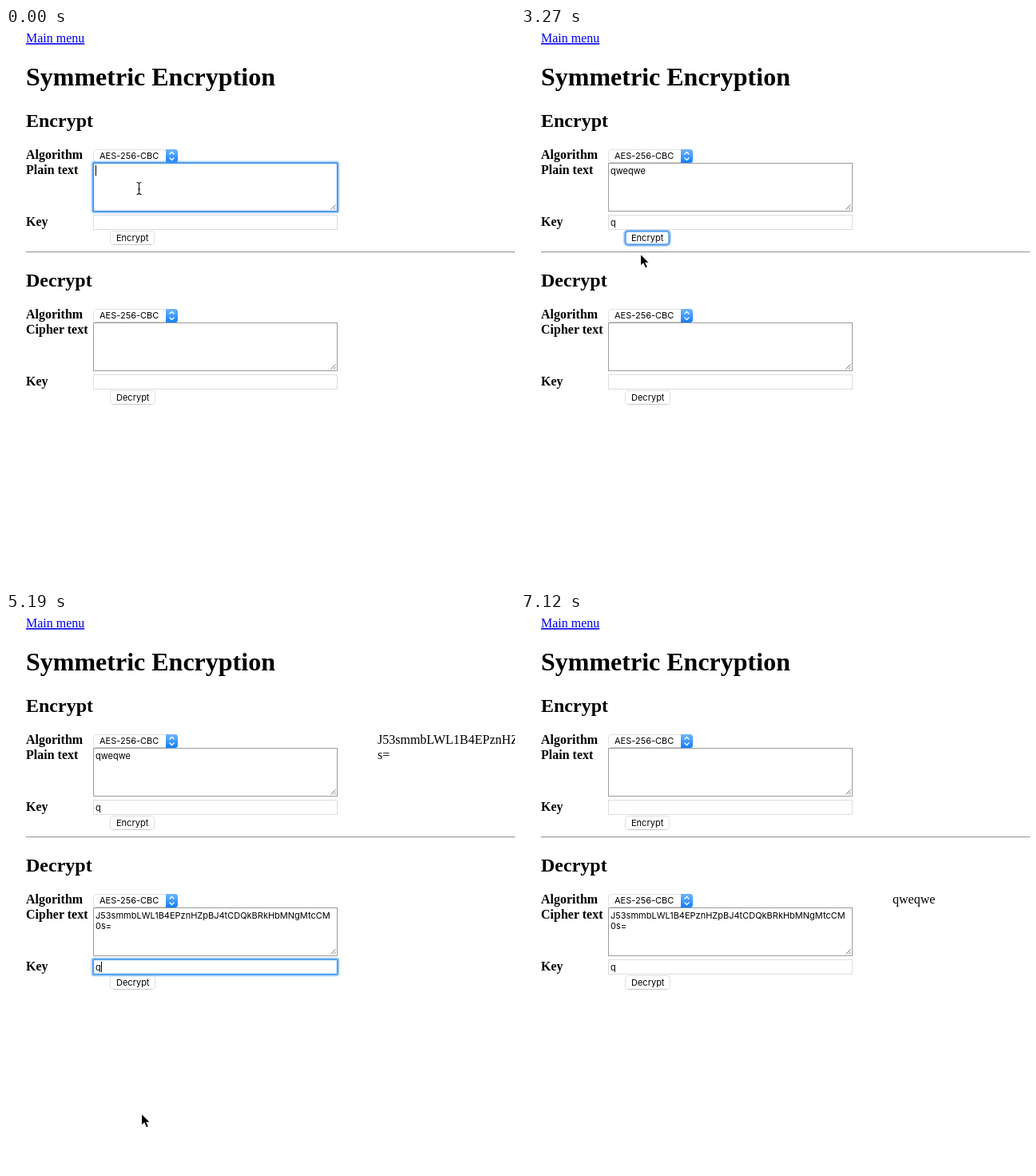
Animation of 637 by 698 pixels, one loop 7420 ms. Source, as an HTML page:

```html
<!DOCTYPE html>
<html lang="en">
<head>
<meta charset="utf-8">
<title>Symmetric Encryption</title>
<style>
html, body { margin: 0; width: 100%; height: 100%; overflow: hidden; background: #fff; }
svg { display: block; }
text { font: 16px "Liberation Serif", serif; white-space: pre; }
.h1 { font-size: 32px; font-weight: bold; }
.h2 { font-size: 24px; font-weight: bold; }
.label { font-weight: bold; }
.link { fill: #00e; text-decoration: underline; }
.ui { font: 11px Inter, sans-serif; }
.menu { font: bold 13px Inter, sans-serif; }
</style>
</head>
<body>
<svg id="stage" width="637" height="698" viewBox="0 0 637 698">
  <defs>
    <linearGradient id="blue" x2="0" y2="1"><stop stop-color="#6fb6fb"/><stop offset="1" stop-color="#127eff"/></linearGradient>
    <linearGradient id="pressed" x2="0" y2="1"><stop stop-color="#4f9ffa"/><stop offset="1" stop-color="#0a62e0"/></linearGradient>
  </defs>
  <g id="page"></g>
</svg>
<script>
const LOOP = 7420;
const CIPHER = 'J53smmbLWL1B4EPznHZpBJ4tCDQkBRkHbMNgMtcCM';
const SAVED = 'q4B3@qPzx4b#F27';
const page = document.getElementById('page');
const pen = document.createElement('canvas').getContext('2d');

// Each step changes part of the state; pointer = [kind, x, y]
const start = { plain: '', key1: '', key2: '', cipher: false, focus: 'plain', caret: true,
  menu: '', result: '', pressed: false, pointer: ['beam', 166.5, 201] };
const at = (x, y, kind = 'arrow') => ({ pointer: [kind, x, y] });
const steps = [
  [140, { plain: 'q' }],
  [290, { plain: 'qw' }],
  [440, { plain: 'qwe' }],
  [590, { plain: 'qweq' }],
  [740, { plain: 'qweqwe' }],
  [880, { focus: 'key1' }],
  [1330, { key1: 'q', ...at(166.5, 202, 'beam') }],
  [1630, { menu: 'key1' }],
  [1930, { menu: '', focus: 'button' }],
  [2980, at(164, 222, 'beam')],
  [3130, at(157, 252)],
  [3270, at(150, 284)],
  [3420, at(148, 300)],
  [3710, { focus: '', result: 'cipher', cipher: true, ...at(148, 324) }],
  [3860, at(149, 376, 'beam')],
  [4000, at(151, 414, 'beam')],
  [4150, at(152, 432)],
  [4300, at(155, 444, 'beam')],
  [4440, { focus: 'key2', ...at(155, 445, 'beam') }],
  [4590, { key2: 'q' }],
  [4740, { menu: 'key2', ...at(155, 457) }],
  [4890, { menu: '', ...at(158, 500) }],
  [5040, at(166, 575)],
  [5190, at(170, 628)],
  [5340, at(170, 612)],
  [5480, at(169, 550)],
  [5630, at(168, 490)],
  [5780, at(167.5, 457)],
  [5930, { focus: '', pressed: true }],
  [6080, { pressed: false }],
  [6220, { plain: '', key1: '', result: 'plain' }],
  [6520, at(205, 482)],
  [6670, at(310, 548)],
  [6820, at(430, 622)],
  [6970, at(546, 679)],
  [7120, { pointer: null }]
];

const esc = s => s.replace(/&/g, '&amp;').replace(/</g, '&lt;');
const text = (x, y, s, cls = '') => `<text x="${x}" y="${y}" class="${cls}">${esc(s)}</text>`;
const rect = (x, y, w, h, fill, more = '') => `<rect x="${x}" y="${y}" width="${w}" height="${h}" fill="${fill}" ${more}/>`;
const path = (d, stroke, more = '') => `<path d="${d}" fill="none" stroke="${stroke}" ${more}/>`;
const frame = (x, y, w, h, color, fill = '#fff', r = 0) =>
  rect(x + .5, y + .5, w - 1, h - 1, fill, `stroke="${color}" rx="${r}"`);
const width = s => { pen.font = '11px Inter, sans-serif'; return pen.measureText(s).width; };

function ring(x, y, w, h, r = 1) {
  return rect(x - .5, y - .5, w + 1, h + 1, 'none', `rx="${r + 1}" stroke="#5ca6f5" stroke-opacity=".45" stroke-width="4"`)
    + rect(x, y, w, h, 'none', `rx="${r}" stroke="#3c95ee" stroke-opacity=".75" stroke-width="2"`);
}

const caret = (s, y) => rect(112 + Math.ceil(width(s)), y, 1, 13, '#000');

function select(y) {
  return frame(109, y, 106, 17, '#e2e2e2', '#fff', 3.5)
    + path(`M112 ${y + 16.5}H201`, '#cfcfcf')
    + `<path d="M200 ${y}h11.500q3.500 0 3.500 3.500v10q0 3.500 -3.500 3.500h-11.500z" fill="url(#blue)"/>`
    + path(`M204.500 ${y + 6.5}l3 -3l3 3M204.500 ${y + 10.500}l3 3l3 -3`, '#fff', 'stroke-width="1.300"')
    + text(117, y + 12, 'AES-256-CBC', 'ui');
}

function area(y, lines, focused) {
  return frame(109, y, 306, 61, '#9b9b9b')
    + (focused ? ring(109, y, 306, 61) : '')
    + path(`M406.500 ${y + 58.5}l6 -6M410 ${y + 58.5}l2.500 -2.500`, '#777')
    + lines.map((s, i) => text(112, y + 14 + i * 13, s, 'ui')).join('');
}

function field(y, value, focused, filled) {
  let out = frame(109, y, 306, 19, '#dcdcdc', filled ? '#faffbd' : '#fff');
  if (focused) out += ring(109, y, 306, 19);
  if (filled) out += rect(112 + width('q'), y + 3, width(SAVED) - width('q'), 14, '#b7d8df');
  out += text(112, y + 14, filled ? SAVED : value, 'ui');
  return out + (focused && !filled ? caret(value, y + 3) : '');
}

function button(y, w, label, focused, pressed) {
  return frame(130, y, w, 18, pressed ? '#1f75e8' : '#e0e0e0', pressed ? 'url(#pressed)' : '#fff', 3.5)
    + (pressed ? '' : path(`M134 ${y + 17.500}H${126 + w}`, '#c9c9c9'))
    + (focused ? ring(130.500, y + .5, w - 1, 17, 3.5) : '')
    + text(138, y + 13, label, 'ui');
}

function menu(y, hover) {
  return frame(109, y, 306, 49, '#93bfea')
    + rect(110, y, 304, 24, '#b3d6ff')
    + text(118, y + 18, SAVED, 'menu') + text(118, y + 42, 'qwe', 'menu');
}

function form(y, title, name, lines, key, n, s) {
  return text(25, y + 8, title, 'h2')
    + text(25, y + 48, 'Algorithm', 'label') + select(y + 36)
    + text(25, y + 67, name, 'label') + area(y + 53, lines, n === 1 && s.focus === 'plain')
    + text(25, y + 132, 'Key', 'label')
    + button(y + 138, n === 1 ? 56 : 57, title, n === 1 && s.focus === 'button', n === 2 && s.pressed)
    + field(y + 118, key, s.focus === 'key' + n, s.menu === 'key' + n);
}

function pointer([kind, x, y]) {
  if (kind === 'beam') {
    const d = 'M-3 -7.500Q0 -7.500 0 -5.500Q0 -7.500 3 -7.500M0 -6V6M-3 7.500Q0 7.500 0 5.500Q0 7.500 3 7.500M-1.500 1H1.500';
    return `<g transform="translate(${x} ${y})">${path(d, '#fff', 'stroke-width="2.500"')}${path(d, '#111', 'stroke-width="1.100"')}</g>`;
  }
  return `<path transform="translate(${x} ${y})" d="M-.5 -1V14.500L3 11.200L5.600 17L8.500 15.700L6 10.200H10.500Z" fill="#000" stroke="#fff" stroke-width="1.100"/>`;
}

function draw(s) {
  let out = text(25, 18, 'Main menu', 'link') + text(25, 72, 'Symmetric Encryption', 'h1')
    + rect(25, 280, 612, 1, '#9a9a9a') + rect(25, 281, 612, 1, '#eee')
    + form(116, 'Encrypt', 'Plain text', [s.plain], s.key1, 1, s)
    + form(316, 'Decrypt', 'Cipher text', s.cipher ? [CIPHER, '0s='] : [], s.key2, 2, s);
  if (s.focus === 'plain') out += caret(s.plain, 172);
  if (s.result === 'cipher') out += text(465, 164, CIPHER + '0') + text(465, 183, 's=');
  if (s.result === 'plain') out += text(465, 364, 'qweqwe');
  if (s.menu) out += menu(s.menu === 'key1' ? 254 : 454);
  if (s.pointer) out += pointer(s.pointer);
  page.innerHTML = out;
}

let shown = -1;
function tick(now) {
  const t = now % LOOP;
  const done = steps.filter(([time]) => time <= t);
  if (done.length !== shown) {
    shown = done.length;
    draw(Object.assign({}, start, ...done.map(step => step[1])));
  }
  requestAnimationFrame(tick);
}
tick(0);
</script>
</body>
</html>
```
